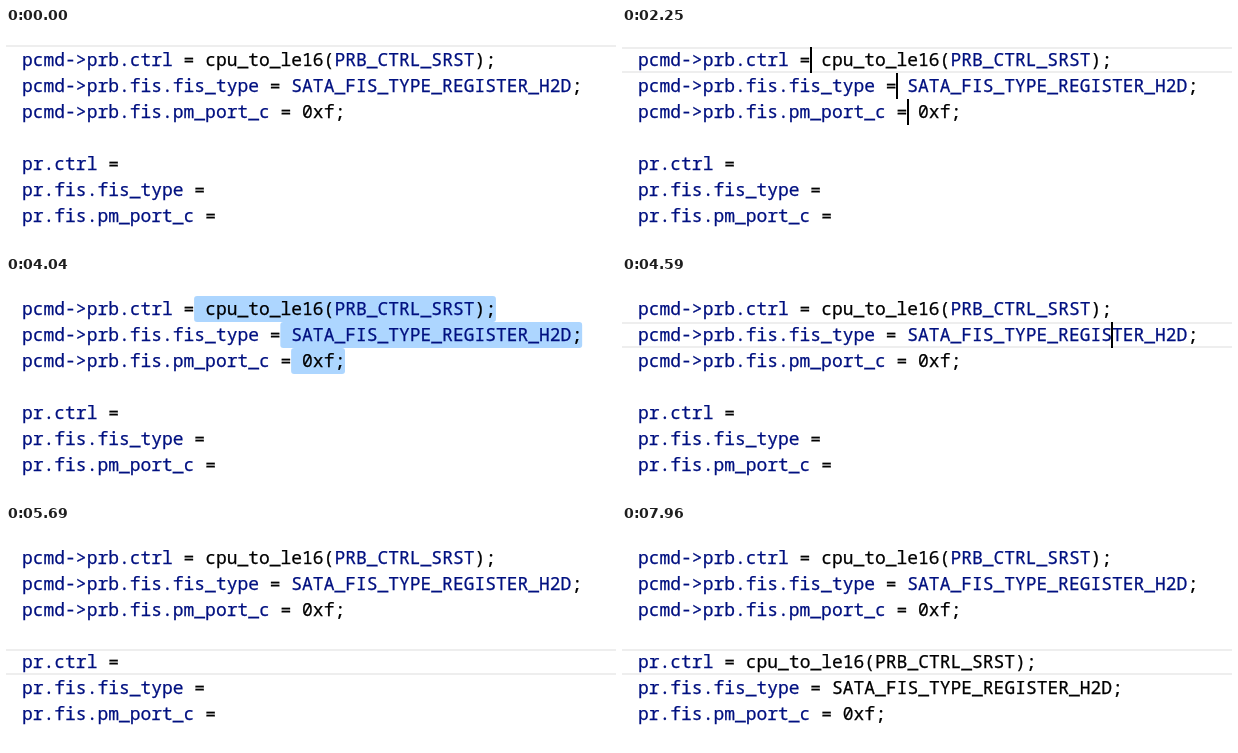
Write an HTML page that moves like this. It is 610 px wide and 221 px high and loops after 8000 ms.

```html
<!DOCTYPE html>
<html lang="en">
<head>
<meta charset="utf-8">
<title>Multi-cursor copy and paste</title>
<style>
  html, body { margin: 0; width: 100%; height: 100%; overflow: hidden; background: #fff; }
  svg { display: block; }
  .code { font: 17.97px "Noto Sans Mono", monospace; white-space: pre; stroke-width: .25px; fill: #000; stroke: #000; }
  .name { fill: #001080; stroke: #001080; }
  .label { font: 700 20.2px Lato, sans-serif; text-anchor: end; }
</style>
</head>
<body>
<svg id="stage" width="610" height="221" viewBox="0 0 610 221"></svg>
<script>
const LOOP = 8000, LEFT = 15.6, TOP = 19, ROW = 26, CHAR = 10.78;
const stage = document.getElementById("stage");
const rowY = row => TOP + row * ROW;
const colX = col => LEFT + col * CHAR;

function add(tag, attrs, text, parent = stage) {
  const el = document.createElementNS("http://www.w3.org/2000/svg", tag);
  for (const key in attrs) el.setAttribute(key, attrs[key]);
  if (text) el.textContent = text;
  parent.appendChild(el);
  return el;
}
const show = (el, on) => el.setAttribute("visibility", on ? "visible" : "hidden");
const rect = (x, y, width, height, fill, rx = 0) => add("rect", { x, y, width, height, fill, rx });

// Cursor stops are [row, column].
const sourceStart = [[0, 16], [1, 24], [2, 25]];
const sourceEnd = [[0, 44], [1, 52], [2, 30]];
const targetStart = [[4, 9], [5, 17], [6, 18]];
const targetEnd = [[4, 37], [5, 45], [6, 23]];

const selections = sourceStart.map(([row, col], i) => {
  const x = colX(col);
  return rect(x, rowY(row), colX(sourceEnd[i][1]) - x, ROW, "#add6ff", 3);
});
const borders = [0, 1].map(() => rect(0, 0, 610, 2, "#eee"));

// Words wrapped in backticks are coloured as names.
function codeLine(row, col, source) {
  const line = add("text", { class: "code", x: colX(col) + 0.4, y: rowY(row) + 19 });
  source.split("`").forEach((part, i) => {
    if (part) add("tspan", i % 2 ? { class: "name" } : {}, part, line);
  });
  return line;
}
codeLine(0, 0, "`pcmd->prb.ctrl` = cpu_to_le16(`PRB_CTRL_SRST`);");
codeLine(1, 0, "`pcmd->prb.fis.fis_type` = `SATA_FIS_TYPE_REGISTER_H2D`;");
codeLine(2, 0, "`pcmd->prb.fis.pm_port_c` = 0xf;");
codeLine(4, 0, "`pr.ctrl` =");
codeLine(5, 0, "`pr.fis.fis_type` =");
codeLine(6, 0, "`pr.fis.pm_port_c` =");
const pasted = [
  codeLine(4, 10, "cpu_to_le16(PRB_CTRL_SRST);"),
  codeLine(5, 18, "SATA_FIS_TYPE_REGISTER_H2D;"),
  codeLine(6, 19, "0xf;")
];

const cursors = [0, 1, 2].map(() => rect(0, 0, 2, ROW, "#000"));
const label = add("text", { class: "label", x: 600, y: 211 });

// Each track holds [time, value] steps.
const cursorTrack = [
  [0, []],
  [310, sourceStart.slice(0, 1)], [770, []],
  [850, sourceStart.slice(0, 2)], [1230, sourceStart], [1780, []], [2250, sourceStart],
  [2640, sourceEnd], [3190, []], [3490, sourceEnd], [3970, []],
  [4270, [[0, 44]]], [4590, [[1, 44]]], [4750, [[2, 30]]], [4910, [[3, 0]]],
  [5060, [[4, 9]]], [5690, []],
  [6010, targetStart.slice(0, 2)], [6310, targetStart], [6940, []],
  [7180, targetEnd], [7730, []]
];
const activeRowTrack = [
  [0, -1], [230, 0], [2640, null], [4270, 0], [4590, 1], [4750, 2], [4910, 3], [5060, 4]
];
const labelTrack = [
  [0, ""], [2560, "Shift + End"], [3260, "Control + c"], [4040, ""],
  [7090, "Control + v"], [7960, ""]
];
const valueAt = (track, t) => track.filter(([start]) => start <= t).pop()[1];

function draw(t) {
  const stops = valueAt(cursorTrack, t);
  cursors.forEach((cursor, i) => {
    show(cursor, i < stops.length);
    if (i >= stops.length) return;
    cursor.setAttribute("x", Math.floor(colX(stops[i][1])));
    cursor.setAttribute("y", rowY(stops[i][0]));
  });

  const row = valueAt(activeRowTrack, t);
  borders.forEach((border, i) => {
    show(border, row !== null);
    border.setAttribute("y", rowY(row) + i * (ROW - 2));
  });

  selections.forEach(el => show(el, t >= 2640 && t < 4270));
  pasted.forEach(el => show(el, t >= 7090));
  label.textContent = valueAt(labelTrack, t);
}

const began = performance.now();
function tick() {
  draw((performance.now() - began) % LOOP);
  requestAnimationFrame(tick);
}
tick();
</script>
</body>
</html>
```
